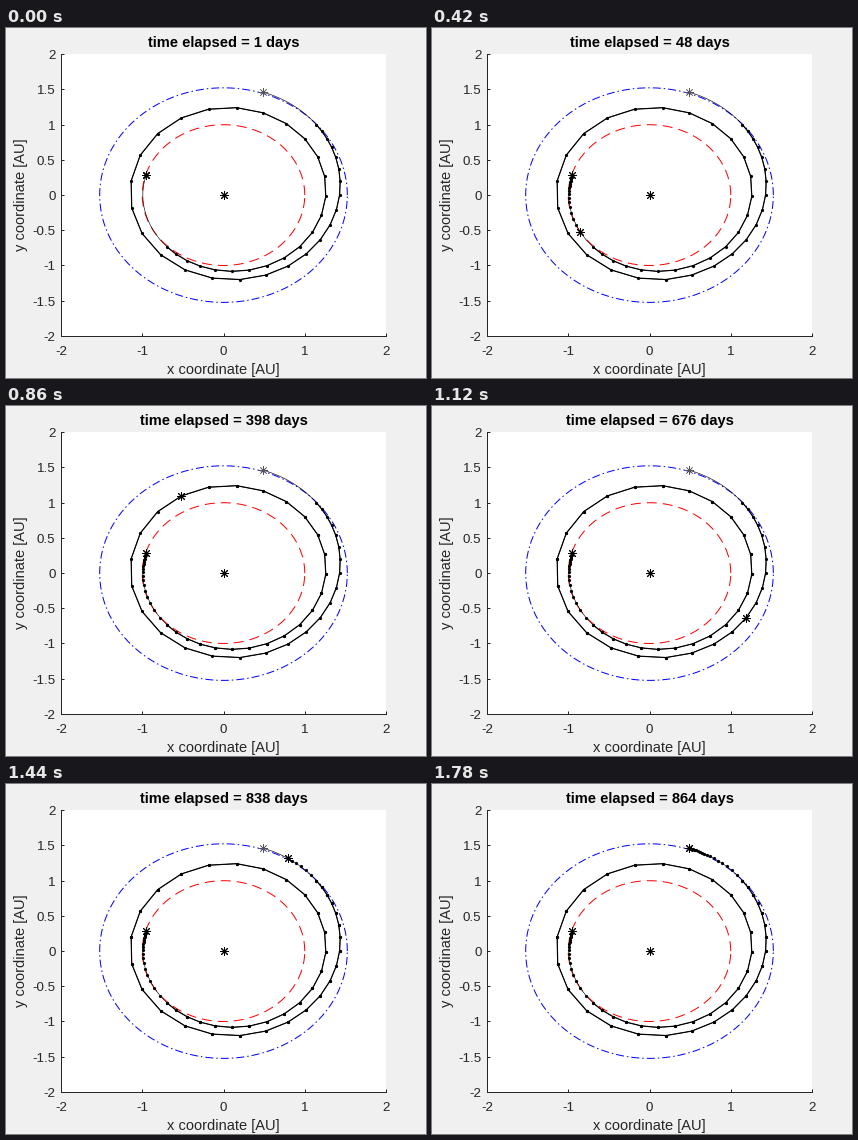
Animation of 420x350 px, one loop 1.8 s. Source, as a matplotlib script:

```python
import numpy as np
import matplotlib.pyplot as plt
from matplotlib.animation import FuncAnimation
from matplotlib.patches import Rectangle

W, H, DPI = 420, 350, 100
PX = 72 / DPI                      # one pixel in points
FRAMES = 90
FLIGHT = 864                       # days
SPARSE = slice(23, 67)             # widely spaced part of the path
HOVER = range(6, 21)               # frames with the axes toolbar showing
GREY, INK, ICON = "#f0f0f0", "#262626", "#6a6a6a"
X0, Y0, SX, SY = 217.5, 167.1, 81.25, 70.4   # plot centre and pixels per AU

plt.rcParams["font.family"] = "Liberation Sans"

# --- motion ---------------------------------------------------------------
# elapsed days: a logistic curve, steeper towards both ends
u = np.arange(FRAMES) - (FRAMES - 1) / 2
day = FLIGHT / (1 + np.exp(-0.1078 * u - 2.34e-5 * u**3))


def radius(a):
    """Conic arcs between the turning points of the path."""
    turns = np.array([188, 392, 567, 790])
    inv = 1 / np.array([0.993, 1.282, 1.141, 1.541])
    a = np.clip(a, turns[0], turns[-1])
    j = np.clip(np.searchsorted(turns, a) - 1, 0, len(turns) - 2)
    ease = (1 - np.cos(np.pi * (a - turns[j]) / (turns[j + 1] - turns[j]))) / 2
    return 1 / (inv[j] + (inv[j + 1] - inv[j]) * ease)


# sweep time follows r^2 / h, with slowly growing angular momentum h
sweep = np.linspace(162.5, 792, 2000)
rate = radius(sweep)**2 / np.linspace(1.01, 1.155, sweep.size)
clock = np.cumsum(rate) - rate[0]
angle = np.interp(day, clock / clock[-1] * FLIGHT, sweep)
px = radius(angle) * np.cos(np.radians(angle))
py = radius(angle) * np.sin(np.radians(angle))

# --- stage ----------------------------------------------------------------
fig = plt.figure(figsize=(W / DPI, H / DPI), dpi=DPI, facecolor=GREY)

ax = fig.add_axes([(X0 - 2 * SX) / W, 1 - (Y0 + 2 * SY) / H,
                   4 * SX / W, 4 * SY / H])
ax.set(xlim=(-2, 2), ylim=(-2, 2), xticks=np.arange(-2, 3),
       yticks=np.arange(-2, 2.1, 0.5))
ax.tick_params(direction="in", length=3 * PX, width=PX, color=INK,
               labelbottom=False, labelleft=False)
ax.spines[["top", "right"]].set_visible(False)
ax.spines[["left", "bottom"]].set(color=INK, linewidth=PX)

# overlay in pixel coordinates, y downwards
ui = fig.add_axes([0, 0, 1, 1])
ui.set(xlim=(0, W), ylim=(H, 0))
ui.axis("off")


def label(x, y, s, size=13.33, ha="center", va="baseline", color=INK, **kw):
    return ui.text(x, y, s, fontsize=size * PX, ha=ha, va=va, color=color, **kw)


for v in ax.get_xticks():
    label(X0 + SX * v, 327, f"{v:g}")
for v in ax.get_yticks():
    label(49.5, Y0 + 5 - SY * v, f"{v:g}", ha="right")
label(X0, 346, "x coordinate [AU]", 14.67)
label(15, Y0, "y coordinate [AU]", 14.67, va="center", rotation=90)
title = label(X0, 19, "", 14.67, color="black", weight="bold")


def orbit(r, color, dashes):
    a = np.linspace(0, 2 * np.pi, 400)
    ax.plot(r * np.cos(a), r * np.sin(a), color=color, lw=PX,
            ls=(0, dashes), dash_capstyle="butt")


def star(x, y, color="black", width=1.0):
    return ax.plot([x], [y], ls="", marker=(8, 2, 0), ms=8.6 * PX,
                   mec=color, mew=width * PX, zorder=5)[0]


def beads(x, y, ls=""):
    return ax.plot(x, y, color="black", ls=ls, lw=1.2 * PX,
                   marker="o", ms=3.2 * PX, mew=0)[0]


orbit(1, "red", (10, 6))
orbit(1.524, "blue", (8, 3, 1.5, 3))
ax.plot(px, py, "k-", lw=0.6 * PX)
beads(px[SPARSE], py[SPARSE], "-")
star(0, 0)
star(px[0], py[0])
star(px[-1], py[-1], "#555555", 0.6)
trail = beads([], [])
craft = star(px[0], py[0])

# --- axes toolbar ---------------------------------------------------------
bar = [ui.add_patch(Rectangle((241, 4), 139, 21, fc=GREY, ec="none", zorder=6))]


def stroke(cx, *pts, width=1.2):
    x, y = np.transpose(pts)
    bar.extend(ui.plot(cx + x, 15 + y, color=ICON, lw=width * PX, zorder=7))


def box(cx, x, y, w, h):
    stroke(cx, (x, y), (x + w, y), (x + w, y + h), (x, y + h), (x, y))


def lens(cx, plus):
    a = np.linspace(0, 2 * np.pi, 40)
    stroke(cx, *zip(6 * np.cos(a) - 1, 6 * np.sin(a) - 1))
    stroke(cx, (3, 3), (8, 8), width=2)
    stroke(cx, (-4, -1), (2, -1))
    if plus:
        stroke(cx, (-1, -4), (-1, 2))


# export
stroke(250, (-6, 0), (-8, 6), (7, 6), (8, 2))
stroke(250, (-4, 3), (0, -2), (7, -2))
stroke(250, (3, -7), (8, -2), (3, 2))
# brush
box(271, -1, -7, 2, 6)
box(271, -4, -1, 8, 3)
stroke(271, (-4, 2), (-6, 7), (6, 7), (4, 2))
# data tip
box(291, -6, -7, 12, 14)
stroke(291, (-3, -2), (4, -2))
stroke(291, (-3, 2), (4, 2))
# hand
for x, top in zip((-4, -1, 2, 5), (-5, -7, -6, -4)):
    stroke(310, (x, top), (x, 1), width=1.8)
stroke(310, (-7, 0), (-3, 6), (3, 6), (6, 0))
lens(330, True)
lens(350, False)
# home
stroke(370, (-8, 1), (0, -7), (8, 1))
stroke(370, (-6, 0), (-6, 7), (6, 7), (6, 0))
box(370, -2, 2, 4, 5)


def update(i):
    craft.set_data([px[i]], [py[i]])
    trail.set_data(px[:i + 1], py[:i + 1])
    title.set_text(f"time elapsed = {np.ceil(day[i]):.0f} days")
    for part in bar:
        part.set_visible(i in HOVER)
    return [craft, trail, title, *bar]


anim = FuncAnimation(fig, update, frames=FRAMES, interval=20,
                     repeat=True, repeat_delay=0, blit=False)
plt.show()
```
